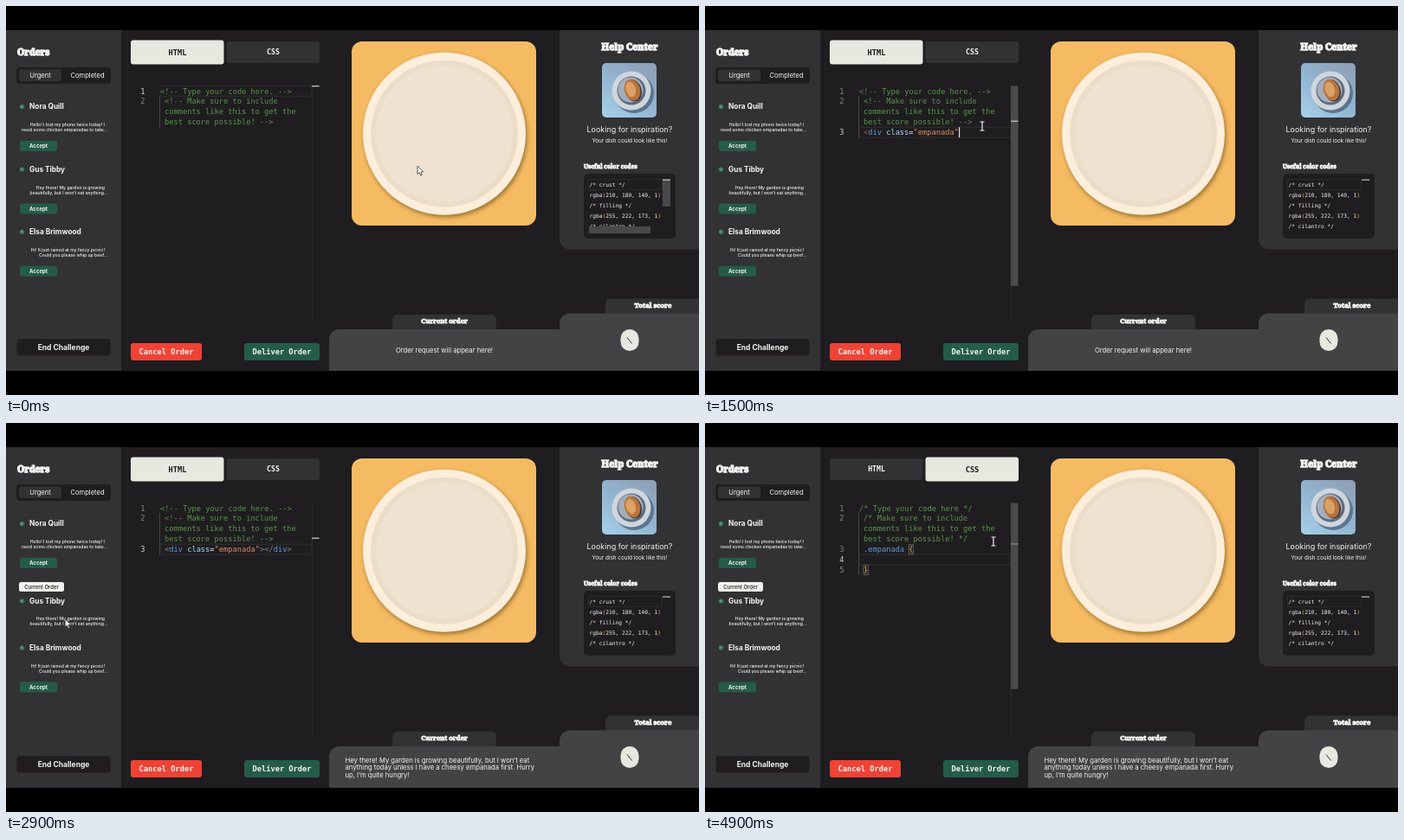
Animation of 800x450 px, one loop 5000 ms. Source, as an HTML page with a canvas:

```html
<!DOCTYPE html>
<html lang="en">
<head>
<meta charset="utf-8">
<title>Cooking code challenge</title>
<style>
  html, body { margin: 0; width: 100%; height: 100%; overflow: hidden; background: #000; }
  canvas { display: block; width: 800px; height: 450px; }
</style>
</head>
<body>
<canvas id="stage" width="800" height="450"></canvas>
<script>
const ctx = document.getElementById('stage').getContext('2d');
const LOOP = 5000, STEP = 100;
const SANS = 'Inter, "Open Sans", sans-serif';
const MONO = '"DejaVu Sans Mono", "Noto Sans Mono", monospace';
const SLAB = '"Noto Serif", "Liberation Serif", serif';
const DARK = '#1f1d20', PANEL = '#323134', RAISED = '#434245';
const LIGHT = '#e7e8e0', GREEN = '#245c49', WHITE = '#f4f4f2';
const COMMENT = '#579548', BLUE = '#569cd6', ATTR = '#9cdcfe';
const STR = '#de8d68', GREY = '#8c8c8c', GOLD = '#efb850';

// Code editor geometry
const ADVANCE = 0.602, CODE = 8.7, CHAR = CODE * ADVANCE;
const ROW = 11.95, TOP = 92.4, VIEW = 272;
const rowX = row => row ? 183 : 178;

// time, x, y of the mouse
const PATH = [
  [0, 475, 185], [300, 308, 54], [400, 308, 54], [600, 320, 141],
  [700, 320, 141], [900, 200, 54], [1000, 200, 54], [1200, 320, 139],
  [2000, 320, 139], [2400, 42, 250], [2500, 37, 235], [2800, 37, 235],
  [3300, 337, 153], [3600, 337, 153], [3900, 308, 54], [4000, 308, 54],
  [4200, 333, 137], [5000, 333, 137]
];

const within = (p, x, y, w, h) => p.x >= x && p.x <= x + w && p.y >= y && p.y <= y + h;

function box(x, y, w, h, color, radius = 0) {
  ctx.fillStyle = color;
  ctx.beginPath();
  ctx.roundRect(x, y, w, h, radius);
  ctx.fill();
}

function disc(x, y, rx, color, ry = rx) {
  ctx.fillStyle = color;
  ctx.beginPath();
  ctx.ellipse(x, y, rx, ry, 0, 0, Math.PI * 2);
  ctx.fill();
}

// y is the middle of the capitals
function text(s, x, y, size, { color = WHITE, align = 'left', weight = 400, face = SANS } = {}) {
  ctx.font = `${weight} ${size}px ${face}`;
  ctx.textAlign = align;
  ctx.fillStyle = color;
  ctx.fillText(s, x, y + size * 0.36);
}

function heading(s, x, y, size, align = 'center') {
  text(s, x, y, size, { align, weight: 700, face: SLAB });
  ctx.strokeStyle = WHITE;
  ctx.lineWidth = size * 0.13;
  ctx.lineJoin = 'round';
  ctx.strokeText(s, x, y + size * 0.36);
}

function button(label, x, y, w, h, color, size, face = SANS, radius = 3) {
  box(x, y, w, h, color, radius);
  text(label, x + w / 2, y + h / 2, size, { align: 'center', weight: 700, face });
}

// Draws [text, colour] runs and returns the x where they end
function codeLine(runs, x, y, size) {
  for (const [s, color] of runs) {
    text(s, x, y, size, { color, face: MONO });
    x += s.length * size * ADVANCE;
  }
  return x;
}

function mouseAt(t) {
  const i = PATH.findIndex((p, k) => k && t < p[0]);
  const [t0, x0, y0] = PATH[i - 1], [t1, x1, y1] = PATH[i];
  const k = (t - t0) / (t1 - t0), e = k * k * (3 - 2 * k);
  return { x: x0 + (x1 - x0) * e, y: y0 + (y1 - y0) * e };
}

function order(name, lines, y, current) {
  if (current) {
    box(15, y - 5, 52, 11, '#f1f1ee', 2.5);
    text('Current Order', 41, y + 0.5, 6, { color: '#222', align: 'center', weight: 500 });
    y += 17;
  }
  disc(18.5, y, 2.7, '#35795f');
  disc(18, y, 1.1, '#6fa38d');
  text(name, 27, y, 8.3, { weight: 700 });
  const gap = current ? 20.5 : 21;
  text(lines[0], 114, y + gap, 5.1, { align: 'right', weight: 500 });
  text(lines[1], 117.5, y + gap + 6, 5.1, { align: 'right', weight: 500 });
  if (!current) button('Accept', 16, y + 39.5, 43, 12, GREEN, 6, SANS, 2.5);
}

function drawOrders(accepted) {
  box(0, 28, 133, 394, PANEL);
  heading('Orders', 13, 53.5, 10.6, 'left');
  box(12, 71, 109, 19, DARK, 4);
  box(15, 73.5, 49, 13.5, PANEL, 3);
  text('Urgent', 39.5, 80.5, 7.6, { align: 'center' });
  text('Completed', 94, 80.5, 7.6, { align: 'center' });
  order('Nora Quill', ['Hello! I lost my phone twice today! I', 'need some chicken empanadas to take...'], 116.5);
  order('Gus Tibby', ['Hey there! My garden is growing', 'beautifully, but I won’t eat anything...'], 189, accepted);
  order('Elsa Brimwood', ['Hi! It just rained at my fancy picnic!', 'Could you please whip up beef...'], accepted ? 260 : 261.3);
  button('End Challenge', 12.5, 385, 108, 19.5, DARK, 8.5, SANS, 4);
}

function drawTab(label, x, active) {
  box(x, active ? 39.5 : 41, 107.5, active ? 28 : 25, active ? LIGHT : PANEL, 3);
  text(label, x + 54, 53.5, active ? 8.7 : 8.2,
    { color: active ? '#1b1b1b' : WHITE, align: 'center', weight: 700, face: MONO });
}

// Rows of [text, colour] runs plus the state of the caret
function editorState(t) {
  const css = (t >= 400 && t < 1000) || t >= 4000;
  const [open, close] = css ? ['/*', ' */'] : ['<!--', ' -->'];
  const rows = [
    `${open} Type your code here${css ? '' : '.'}${close}`,
    `${open} Make sure to include`,
    'comments like this to get the',
    `best score possible!${close}`
  ].map(s => [[s, COMMENT]]);
  const clicked = css ? (t >= 600 && t < 1000) || t >= 4200 : t >= 1200;
  const state = {
    css, rows, nums: ['1', '2', '', ''], pairs: [],
    active: clicked ? 3 : 0, current: clicked ? '' : '1', caret: false
  };
  const addRow = (runs, num) => {
    state.active = rows.push(runs) - 1;
    state.nums.push(num);
    state.current = num;
  };

  if (css) {
    state.caret = clicked && t < 4800;
    if (t >= 4300) {
      const n = Math.round((t - 4300) / 400 * 11);
      const s = '.empanada {'.slice(0, n);
      addRow([[s.slice(0, 10), BLUE], [s.slice(10), GOLD]], '3');
    }
    if (t >= 4800) {
      addRow([], '4');
      rows.push([['}', GOLD]]);
      state.nums.push('5');
      state.pairs = [[4, 10], [6, 0]];
    }
  } else {
    state.caret = t >= 1200 && t < 2100;
    if (t >= 1300) {
      const done = t >= 1600;
      let n = done ? 28 : Math.round((t - 1200) / 300 * 21);
      const parts = [['<', done ? GREY : '#b65b4a'], ['div', BLUE], [' class', ATTR], ['=', WHITE],
        ['"empanada"', STR], ['></', GREY], ['div', BLUE], ['>', GREY]];
      addRow(parts.map(([s, color]) => {
        const run = [s.slice(0, Math.max(0, n)), color];
        n -= s.length;
        return run;
      }), '3');
      if (t >= 3400) state.pairs = [[4, 22], [4, 27]];
    }
  }
  return state;
}

function drawEditor(t, mouse) {
  const { css, rows, nums, active, current, caret, pairs } = editorState(t);
  drawTab('HTML', 144, !css);
  drawTab('CSS', 254.5, css);

  ctx.strokeStyle = '#302f31';
  ctx.lineWidth = 1;
  ctx.strokeRect(178, TOP + active * ROW, 175, ROW);
  box(177, TOP + ROW, 1, (rows.length - 1) * ROW, '#454447');
  box(353, TOP, 1, VIEW, '#29282a');

  rows.forEach((runs, i) => {
    const y = TOP + i * ROW + 6;
    text(nums[i], 160.5, y, CODE,
      { color: nums[i] === current ? '#d0d0d0' : '#858587', align: 'right', face: MONO });
    const end = codeLine(runs, rowX(i), y, CODE);
    if (caret && i === active) box(end, y - 6, 1.2, ROW, '#e8e8e8');
  });

  ctx.strokeStyle = '#7d7d7d';
  ctx.lineWidth = 0.7;
  for (const [r, c] of pairs) ctx.strokeRect(rowX(r) + c * CHAR, TOP + r * ROW + 0.5, CHAR, ROW - 1);

  const scale = VIEW / (VIEW + (rows.length - 1) * ROW);
  if (within(mouse, 144, TOP, 218, VIEW)) box(353, TOP, 8.5, VIEW * scale, '#4b4a4c');
  const mark = TOP + active * ROW * scale;
  if (!css && pairs.length) box(353, mark, 4.5, ROW * scale, '#a0a0a0');
  box(353, mark - 0.5, 8.5, 1.5, css ? '#858585' : '#b5b5b3');

  button('Cancel Order', 144, 390, 82, 20, '#ee4335', CODE, MONO);
  button('Deliver Order', 275, 390, 87, 20, GREEN, CODE, MONO);
}

function drawDish() {
  box(399, 41, 213, 213, '#f5bb62', 12);
  ctx.save();
  ctx.shadowColor = 'rgba(70, 40, 0, .5)';
  ctx.shadowBlur = 5;
  ctx.shadowOffsetX = 1.5;
  ctx.shadowOffsetY = 2.5;
  disc(506, 147.7, 94, '#fdeedc');
  ctx.restore();
  disc(506, 147.7, 85, '#ebdec8');
  disc(506, 147.7, 79, '#efe2d1');
}

function drawRequest(accepted) {
  box(446, 357, 120, 24, PANEL, 6);
  box(373, 374, 267, 48, RAISED, [12, 0, 0, 0]);
  heading('Current order', 506, 364.5, 7.5);
  if (accepted) {
    ['Hey there! My garden is growing beautifully, but I won’t eat',
      'anything today unless I have a cheesy empanada first. Hurry',
      'up, I’m quite hungry!'].forEach((s, i) => text(s, 391.5, 390 + i * 8.6, 7.65));
  } else {
    text('Order request will appear here!', 506, 398.5, 7.65, { align: 'center' });
  }
}

function drawPhoto() {
  ctx.save();
  ctx.beginPath();
  ctx.roundRect(688, 66, 63, 63, 5);
  ctx.clip();
  const table = ctx.createLinearGradient(742, 66, 697, 129);
  table.addColorStop(0, '#8f9fb6');
  table.addColorStop(0.5, '#92b4d0');
  table.addColorStop(1, '#a5cde6');
  box(688, 66, 63, 63, table);
  disc(725, 101, 23, '#5b7590');
  disc(722, 98, 22.5, '#cfd6dd');
  disc(722, 98, 16.5, '#5c6b7f');
  disc(721, 97, 14.5, '#a4aebb');
  ctx.translate(723, 97);
  ctx.rotate(-0.3);
  disc(1, 1, 9.5, '#4b3a35', 13);
  disc(0, 0, 9, '#b8743c', 12.5);
  disc(-1.5, -1, 5.5, '#dca164', 9);
  ctx.restore();
}

function drawHelp(t) {
  box(639, 28, 161, 253.5, PANEL, [0, 0, 0, 12]);
  heading('Help Center', 720, 47.5, 10.8);
  drawPhoto();
  text('Looking for inspiration?', 720, 142.5, 8.95, { align: 'center' });
  text('Your dish could look like this!', 720, 156, 6.35, { align: 'center' });
  heading('Useful color codes', 667, 185.5, 6.7, 'left');

  box(667, 194, 106, 75, DARK, 5);
  ctx.strokeStyle = '#2b2a2c';
  ctx.lineWidth = 1;
  ctx.strokeRect(672.5, 200.5, 85, 12);
  ['/* crust */', 'rgba(210, 180, 140, 1)', '/* filling */', 'rgba(255, 222, 173, 1)', '/* cilantro */']
    .forEach((s, i) => {
      const runs = s.split(/([()])/).map(part => [part, /[()]/.test(part) ? GOLD : WHITE]);
      codeLine(runs, 673.5, 206.5 + i * 12, 6.23);
    });
  if (t < 200) {
    box(758, 200, 9, 32, '#49484a');
    box(673, 255, 71, 8, '#49484a');
  }
  box(758, 200.5, 9, 1.3, '#b5b5b3');
}

function drawScore() {
  box(692, 338.5, 108, 24, PANEL, [6, 0, 0, 0]);
  box(639, 355.5, 161, 66.5, RAISED, [12, 0, 0, 0]);
  heading('Total score', 747, 346.5, 7.7);
  box(709.5, 374, 21, 25, LIGHT, 10.5);
  ctx.strokeStyle = '#333';
  ctx.lineWidth = 1;
  ctx.beginPath();
  ctx.moveTo(717, 383.5);
  ctx.lineTo(722.5, 390.5);
  ctx.stroke();
}

function outline(points, x, y) {
  ctx.beginPath();
  points.forEach(([dx, dy]) => ctx.lineTo(x + dx, y + dy));
  ctx.closePath();
}

function drawMouse(p) {
  const { x, y } = p;
  ctx.lineJoin = 'round';
  if (within(p, 176, TOP, 177, VIEW)) {
    ctx.strokeStyle = '#f2f2f2';
    ctx.lineWidth = 1.2;
    ctx.beginPath();
    for (const side of [-1, 1]) {
      ctx.moveTo(x - 2.5, y + side * 5);
      ctx.lineTo(x + 2.5, y + side * 5);
    }
    ctx.moveTo(x, y - 5);
    ctx.lineTo(x, y + 5);
    ctx.stroke();
    return;
  }
  const hand = within(p, 144, 40, 218, 27) || within(p, 16, 228, 43, 13);
  outline(hand
    ? [[-1, 0], [1, 0], [1, 4], [5, 5], [6, 7], [5, 12], [-1, 12], [-4, 7], [-3, 6], [-1, 7]]
    : [[0, 0], [0, 9.5], [2.2, 7.6], [3.8, 11], [5.3, 10.3], [3.8, 7], [6.6, 6.8]], x, y);
  ctx.fillStyle = '#fff';
  ctx.fill();
  ctx.strokeStyle = '#333';
  ctx.lineWidth = 0.8;
  ctx.stroke();
}

function draw(now) {
  const t = Math.floor((now % LOOP) / STEP) * STEP;
  const accepted = t >= 2700;
  const mouse = mouseAt(t);
  box(0, 0, 800, 450, '#000');
  box(0, 28, 800, 394, DARK);
  drawOrders(accepted);
  drawEditor(t, mouse);
  drawDish();
  drawRequest(accepted);
  drawHelp(t);
  drawScore();
  drawMouse(mouse);
}

function tick() {
  draw(performance.now());
  requestAnimationFrame(tick);
}
tick();
</script>
</body>
</html>
```
